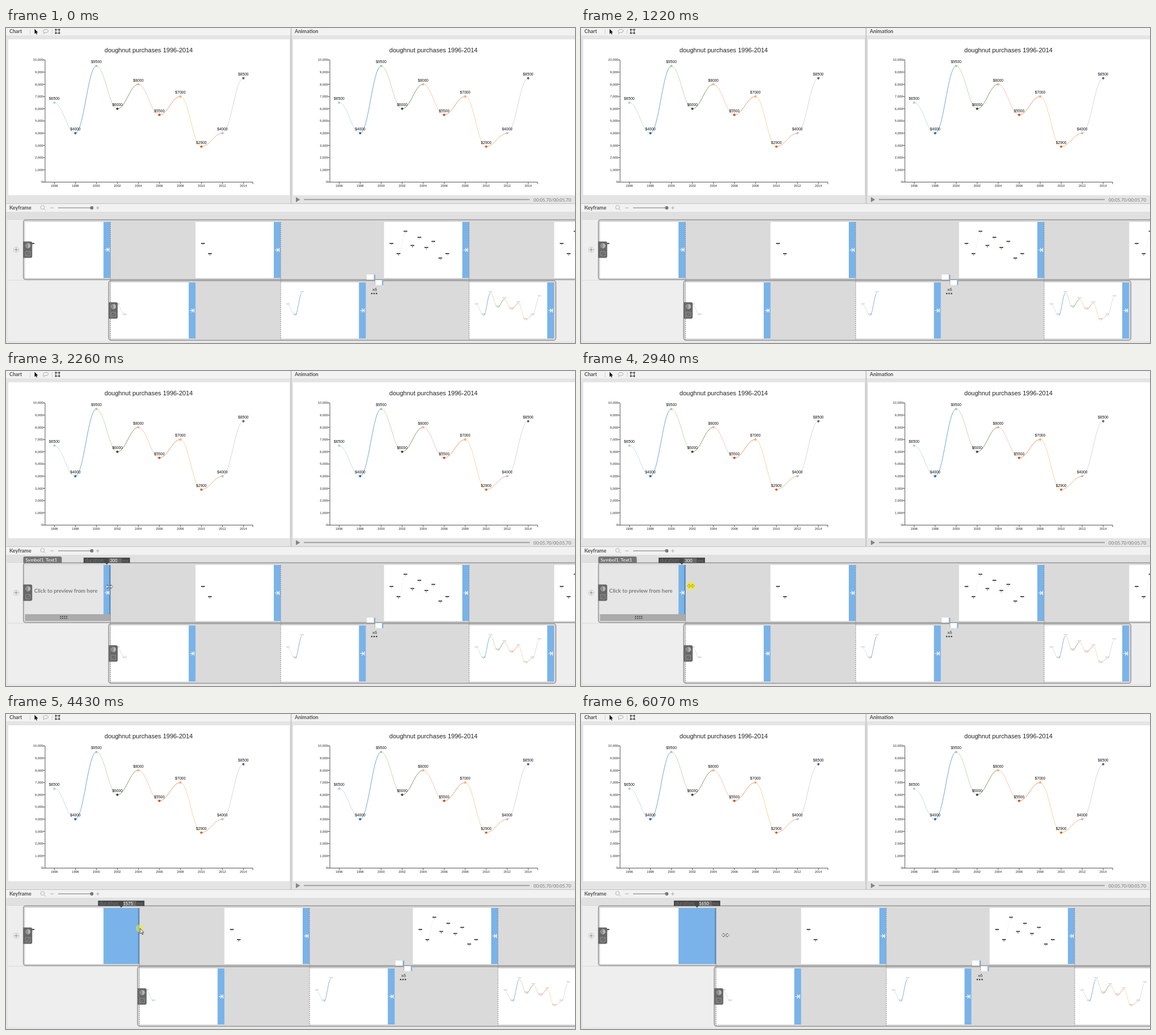
Animation, 1005 px wide and 557 px high, one loop 8000 ms. Source, as an HTML page:

```html
<!DOCTYPE html>
<html lang="en">
<head>
<meta charset="utf-8">
<title>Keyframe editor</title>
<style>
html, body { margin: 0; width: 100%; height: 100%; overflow: hidden; background: #e4e4e4; }
svg { display: block; }
text { font-family: Lato, "Open Sans", sans-serif; }
.plot text { font-family: "Liberation Sans", Arial, sans-serif; }
.head { font-weight: 700; font-size: 9px; fill: #505050; }
</style>
</head>
<body>
<svg id="stage" width="1005" height="557" viewBox="0 0 1005 557"></svg>
<script>
const LOOP = 8000, MS_PER_PX = 25, BLUE = '#79b3e9';
const values = [6500, 4000, 9500, 6000, 8000, 5500, 7000, 2900, 4000, 8500];
const dotColors = ['#a9cfe6', '#2268b8', '#a9d394', '#3f4c3c', '#f9b184', '#cc4f1e', '#fbb073', '#cd6415', '#bdbccb', '#6c5b94'];
const lineColors = ['#c4dfe4', '#6da4d6', '#bfdcae', '#7d9d66', '#f6c3b7', '#e79468', '#f8d3a0', '#efb284', '#d6d6dd'];
const px = i => 85.4 + 37.1 * i;
const py = v => 272.4 - v * 0.0216;

const rect = (x, y, w, h, fill, more = '') =>
  `<rect x="${x}" y="${y}" width="${w}" height="${h}" fill="${fill}" ${more}/>`;
const path = (d, stroke, w = 1, more = '') =>
  `<path d="${d}" fill="none" stroke="${stroke}" stroke-width="${w}" ${more}/>`;
const shape = (d, fill) => `<path d="${d}" fill="${fill}"/>`;
const circle = (x, y, r, fill, more = '') =>
  `<circle cx="${x}" cy="${y}" r="${r}" fill="${fill}" ${more}/>`;
const text = (x, y, s, size, fill, anchor = 'start', more = '') =>
  `<text x="${x}" y="${y}" font-size="${size}" fill="${fill}" text-anchor="${anchor}" ${more}>${s}</text>`;
const times = (n, f) => Array.from({ length: n }, (_, i) => f(i)).join('');

// S-shaped link with flat ends between two neighbouring points
function link(i, w, more) {
  const [a, b, y0, y1] = [px(i), px(i + 1), py(values[i]), py(values[i + 1])];
  const k = (b - a) * 0.4;
  return path(`M${a},${y0}C${a + k},${y0} ${b - k},${y1} ${b},${y1}`, lineColors[i], w, more);
}

function chart(dx) {
  const axis = path('M65,56.5H69V272.5M65,272.5H436V276', '#555', 1);
  const yTicks = times(11, i => {
    const y = py(i * 1000);
    return path(`M65,${y}h4`, '#555') +
      text(65.5, y + 2, (i * 1000).toLocaleString('en-US'), 5.7, '#222', 'end');
  });
  const xTicks = times(10, i => path(`M${px(i)},272v4`, '#555') +
    text(px(i), 281, 1996 + 2 * i, 5.6, '#222', 'middle'));
  const marks = times(10, i => circle(px(i), py(values[i]), 2.1, dotColors[i]) +
    text(px(i), py(values[i]) - 5, '$' + values[i], 6.7, '#111', 'middle'));
  return `<g class="plot" transform="translate(${dx})">` +
    text(252, 43, 'doughnut purchases 1996-2014', 11.05, '#222', 'middle') +
    axis + yTicks + xTicks + times(9, i => link(i, 1)) + marks + '</g>';
}

function thumb(x, y, body) {
  return rect(x, y, 138.5, 99, '#fff') +
    `<svg x="${x}" y="${y}" width="138.5" height="99"><g transform="translate(-15.2 -3.4) scale(.332)">${body}</g></svg>`;
}
const tags = (n, alpha) => times(n, i => rect(px(i) - 10, py(values[i]) - 10, 20, 5, '#222', `opacity="${alpha}"`));
const dotThumb = (x, n) => thumb(x, 343,
  (n > 2 ? link(1, 2, 'opacity=".2"') : '') + tags(n, .95) +
  times(n, i => circle(px(i), py(values[i]), 2.6, dotColors[i])));
const lineThumb = (x, n) => thumb(x, 450, times(n, i => link(i, 2.6)) + tags(n + 1, .2));

const skipIcon = (x, y) => path(`M${x - 4},${y}h6M${x - 1},${y - 3}l3.2,3l-3.2,3M${x + 3.5},${y - 3.6}v7.2`, '#fff', 1.2);
const handle = (x, y) => rect(x, y, 12, 99, BLUE) + skipIcon(x + 6, y + 49.5);
const dash = x => path(`M${x},343V551`, '#868686', 1, 'stroke-dasharray="2 1.5"');

function toggles(x, y) {
  return shape(`M${x},${y}h13q3,0 3,3v23q0,3 -3,3h-13z`, '#676767') +
    circle(x + 8.5, y + 7.5, 4.2, '#8a8a8a', 'stroke="#aaa" stroke-width=".8"') +
    shape(`M${x + 8.5},${y + 3.3}a4.2,4.2 0 0 1 0,8.4z`, '#b4b4b4') +
    path(`M${x + 4.5},${y + 17.5}h8v8h-8zM${x + 6},${y + 24}l5,-5`, '#999', .9);
}

function tab(id, x, y, w, label) {
  return `<g id="${id}">` +
    shape(`M${x},${y + 11.5}v-8.5q0,-3 3,-3h${w - 6}q3,0 3,3v8.5z`, '#747474') +
    text(x + 4, y + 8.8, label, 8.4, '#fff') + '</g>';
}

function preview(id, x, y) {
  return `<g id="${id}">` + rect(x, y, 138.5, 99, '#e6e6e6') +
    text(x + 72.2, y + 49.3, 'Click to preview from here', 9.5, '#7d7d7d', 'middle', 'font-weight="700"') +
    rect(x, y + 87, 151, 12, '#ababab') +
    times(8, i => rect(x + 62 + (i % 4) * 3.6, y + 90 + (i >> 2) * 3.4, 1.9, 1.9, '#444')) + '</g>';
}

const frame = (x, y, w, h) => rect(x, y, w, h, '#dadada', 'rx="4" stroke="#989898" stroke-width="1.5"');

const panels =
  rect(0, 0, 1005, 557, '#e4e4e4') + rect(0, 0, 1005, 13, '#f2f2f2') +
  rect(4, 20, 497, 275.5, '#fff') + rect(507, 20, 498, 275.5, '#fff') +
  rect(502.5, 0, 2, 310, '#c6c6c6') +
  text(6, 9.4, 'Chart', 9, '', 'start', 'class="head"') +
  text(510, 9.4, 'Animation', 9, '', 'start', 'class="head"') +
  path('M42.5,2V11M81.5,2V11', '#d0d0d0') +
  shape('M50.5,1.5v9l2,-1.9l1.4,2.8l1.3,-.6l-1.3,-2.8h2.6z', '#111') +
  path('M67,8.5c-3,-3 -.5,-6 3.5,-6s6,3.5 2,5.2c-2,.8 -4.5,.3 -5.5,.8s0,1.5 -.5,2.5', '#a5a5a5', 1) +
  path('M88,3h6v6h-6z', '#444', 1) +
  times(4, i => rect(86.6 + (i % 2) * 6.2, 1.6 + (i >> 1) * 6.2, 2.6, 2.6, '#444')) +
  shape('M512,299v9l7.5,-4.5z', '#858585') +
  rect(526, 302.3, 399, 2, '#a2a2a2') +
  text(998, 306.6, '00:05.70/00:05.70', 7.9, '#777', 'end') +
  rect(0, 310, 1005, 15, '#f2f2f2') + rect(0, 310, 1005, 1, '#c2c2c2') +
  text(6, 321, 'Keyframe', 9, '', 'start', 'class="head"') +
  circle(64.5, 317, 3.4, 'none', 'stroke="#b5b5b5"') + path('M67,319.5l3,3', '#b5b5b5') +
  path('M78,318h6M159,318h6M162,315v6', '#aaa') +
  path('M92,318H150', '#777', 1.2) + circle(151.5, 318, 3, '#777');

const timeline =
  rect(0, 325, 1005, 13, '#e0e0e0') + rect(0, 338, 1005, 219, '#eeeeee') +
  rect(0, 338, 3, 219, '#e6e6e6') + rect(0, 553.5, 1005, 3.5, '#e6e6e6') +
  path('M3,338.5H1005M3,446H1005', '#d8d8d8') +
  circle(18, 392, 4.6, 'none', 'stroke="#999" stroke-dasharray="1.5 1.2" stroke-width=".9"') +
  path('M15,392h6M18,389v6', '#888') +
  frame(30.7, 339.2, 1040, 105.6) + dotThumb(33.7, 1) +
  preview('previewTop', 33.5, 343) +
  rect(172.3, 343, 12, 99, BLUE, 'id="grip"') + rect(182, 343, 2.2, 99, '#528dc6', 'id="edge"') +
  rect(172.3, 430, 12.2, 12, '#ababab', 'id="gripBar"') +
  `<g id="gripIcon">${skipIcon(178.5, 392)}</g>` +
  toggles(30.3, 377.5) +
  '<g id="rest">' +
  dotThumb(334.7, 2) + handle(473, 343) + dotThumb(667.7, 9) + handle(806, 343) + dotThumb(968.3, 9) +
  frame(181.3, 446.8, 790, 105.4) +
  lineThumb(184.5, 1) + handle(322.7, 450) + lineThumb(485, 2) + handle(623.5, 450) +
  lineThumb(818, 9) + handle(956, 450) +
  preview('previewLow', 184.5, 450) + toggles(181.3, 485) +
  dash(184.5) + dash(485.2) + dash(818) +
  rect(637, 436, 13, 9, '#fff') + rect(649.7, 436, 2.3, 9.5, BLUE) +
  rect(652, 446, 12.3, 8.5, '#fff') + rect(664, 446, 2.3, 8.5, BLUE) +
  path('M651.8,437V454M637,445.3H652', '#999', .7) +
  text(651.3, 465.3, 'x6', 7.6, '#333', 'middle') +
  times(3, i => circle(646 + i * 4.2, 469.5, 1.3, '#333')) +
  '</g>' +
  tab('linkTab', 181, 436, 30, 'Link1') + tab('topTab', 30.5, 328, 68, 'Symbol1, Text1');

const tooltip = '<g id="tip">' + rect(0, 330, 82, 9.5, '#484848') +
  shape('M38,339h6l-3,3.5z', '#484848') +
  text(2.5, 337.8, 'duration:', 8.8, '#777') + rect(44.5, 331, 23, 8, '#686868') +
  text(53, 337.8, '', 7.6, '#fff', 'middle', 'id="ms"') +
  text(68.5, 337.8, 'ms', 8.4, '#777') + '</g>';

const pointer = '<g id="pointer">' + circle(0, 0, 7, '#f3eb38', 'id="glow"') +
  '<path id="arrow" d="M.5,.2v9.4l2.2,-2l1.6,3.5l1.4,-.7l-1.6,-3.3h2.9z" fill="#fff" stroke="#222" stroke-width=".8"/>' +
  '<path id="sizer" d="M-6.6,0l3.6,-3.4v2.4h6v-2.4l3.6,3.4l-3.6,3.4v-2.4h-6v2.4z" stroke-width=".7"/></g>';

const stage = document.getElementById('stage');
stage.innerHTML = panels + chart(0) + chart(503) + timeline + tooltip + pointer;
const el = {};
stage.querySelectorAll('[id]').forEach(n => el[n.id] = n);
const show = (id, on) => el[id].setAttribute('display', on ? 'inline' : 'none');

// start, end, steps, look, [progress, x, y] points
const moves = [
  [610, 1220, 9, 'arrow', [[0, 424, 545], [.5, 372, 522], [1, 300, 548]]],
  [1220, 1220, 1, '', [[0, 0, 0]]],
  [1550, 2320, 11, 'auto', [[0, 262, 538], [.3, 201, 408], [.7, 183, 384], [1, 182, 380]]],
  [2640, 3420, 11, 'sizer glow', [[0, 182, 380], [.3, 194, 380], [1, 231, 380]]],
  [3490, 3490, 1, 'sizer glow', [[0, 234, 380]]],
  [3630, 3630, 1, 'sizer glow', [[0, 236.5, 379.5]]],
  [4430, 4430, 1, 'arrow glow', [[0, 236.5, 379]]],
  [5210, 5210, 1, 'sizer', [[0, 237.5, 382]]],
  [5820, 6070, 4, 'sizer', [[0, 242, 384], [1, 255, 391]]]
];
const durations = [[0, 300], [4430, 1575], [5130, 1625], [5210, 1650]];
const latest = (rows, t) => rows.filter(r => r[0] <= t).pop();

function pointerAt(t) {
  const move = latest(moves, t);
  if (!move || !move[3]) return { look: '', x: 0, y: 0 };
  const [start, end, n, look, pts] = move;
  const u = n < 2 ? 0 : Math.min(1, Math.floor((t - start) / (end - start) * (n - 1) + 1e-6) / (n - 1));
  const j = Math.max(1, pts.findIndex(p => p[0] >= u));
  const a = pts[j - 1], b = pts[j] || a;
  const f = b === a ? 0 : (u - a[0]) / (b[0] - a[0]);
  const x = a[1] + (b[1] - a[1]) * f, y = a[2] + (b[2] - a[2]) * f;
  return { look: look === 'auto' ? (x < 190 ? 'sizer' : 'arrow') : look, x, y };
}

function draw(t) {
  const p = pointerAt(t), ms = latest(durations, t)[1];
  const width = ms / MS_PER_PX, wide = ms > 300;
  const hovering = t >= 1700 && p.look.includes('sizer') && !wide;
  const low = p.look && p.y > 447;
  const lit = p.look.includes('glow');

  show('pointer', p.look);
  for (const part of ['arrow', 'sizer', 'glow']) show(part, p.look.includes(part));
  el.glow.setAttribute('opacity', p.look.includes('arrow') ? .55 : .95);
  el.sizer.setAttribute('fill', lit ? '#f3eb38' : '#fff');
  el.sizer.setAttribute('stroke', lit ? '#8f871c' : '#333');
  el.pointer.setAttribute('transform', `translate(${p.x} ${p.y})`);

  show('linkTab', low || (t >= 1550 && t < 2320 && !hovering));
  show('previewLow', low && p.x > 184 && p.x < 323);
  for (const id of ['previewTop', 'topTab', 'gripBar']) show(id, hovering);
  show('edge', hovering || wide);
  show('tip', hovering || wide);
  show('gripIcon', !wide);

  el.grip.setAttribute('width', width);
  el.edge.setAttribute('x', 170.3 + width);
  el.rest.setAttribute('transform', `translate(${width - 12})`);
  el.tip.setAttribute('transform', `translate(${131 + width / 2})`);
  el.ms.textContent = ms;
}

function tick() {
  draw(performance.now() % LOOP);
  requestAnimationFrame(tick);
}
tick();
</script>
</body>
</html>
```
